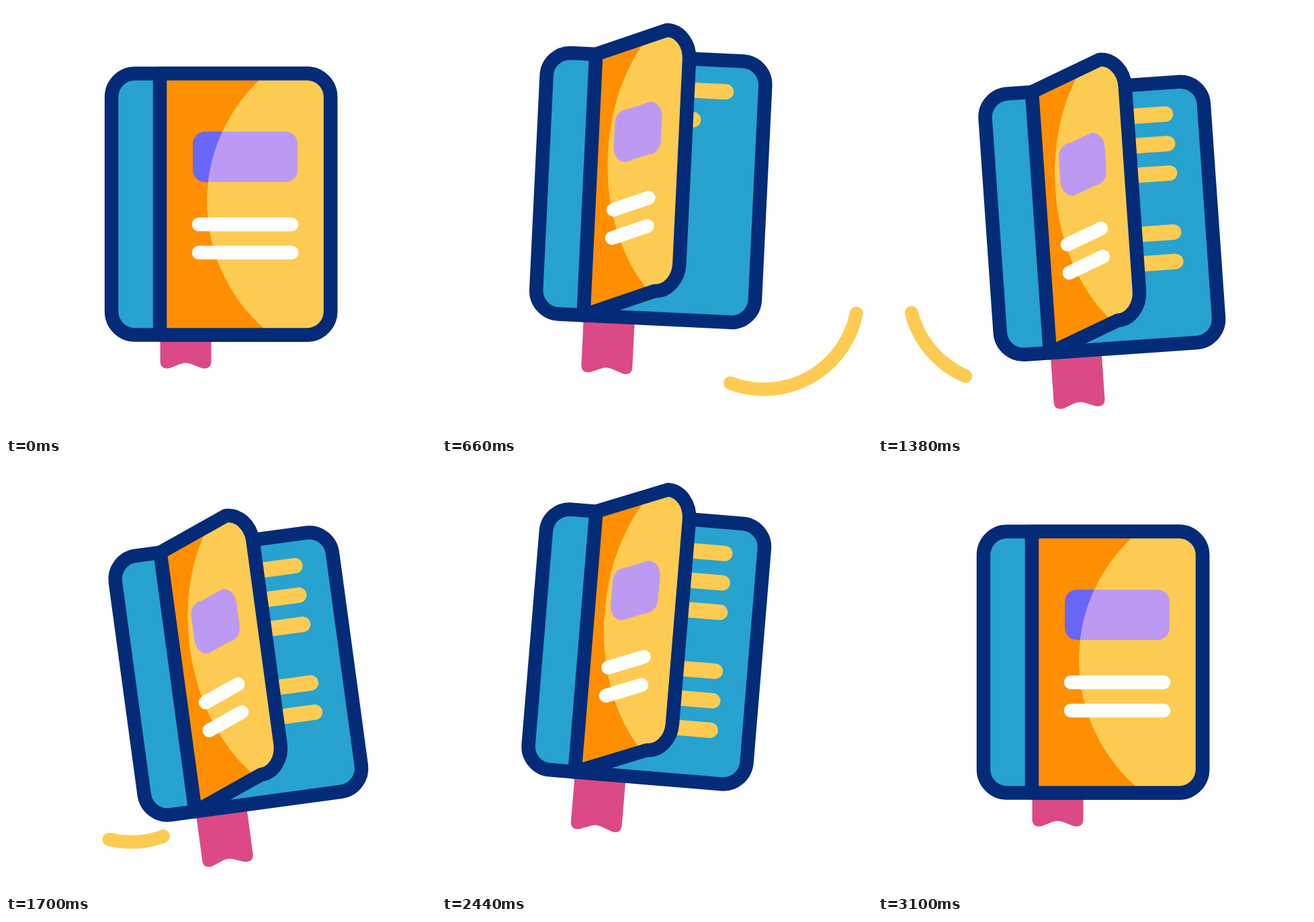
An HTML page with a canvas for the animation above (3.4 s loop, 640 by 640 pixels).

```html
<!DOCTYPE html>
<html lang="en">
<head>
<meta charset="utf-8">
<title>Notebook</title>
<style>
  html, body { margin: 0; height: 100%; overflow: hidden; background: #fff; }
  canvas { display: block; width: 640px; height: 640px; }
</style>
</head>
<body>
<canvas id="stage" width="640" height="640"></canvas>
<script>
const ctx = document.getElementById('stage').getContext('2d');
const LOOP = 3400, SPINE = 229, TOP = 100.5, BOTTOM = 489.5, BORDER = 20.5;
const NAVY = '#032b77', TEAL = '#28a2ce', ORANGE = '#ff8f00', YELLOW = '#fdcb52',
      VIOLET = '#6a67f8', LILAC = '#bc9af3', PINK = '#db4a87';
const ROW_STARTS = [320, 530, 740, 950, 1160, 1810];

const mix = (a, b, u) => a + (b - a) * u;
const radians = degrees => degrees * Math.PI / 180;

function ease(t, from, to) {
  const u = Math.min(1, Math.max(0, (t - from) / (to - from)));
  return u * u * (3 - 2 * u);
}

// Eased value through [time, value] keys
function track(t, keys) {
  let value = keys[0][1];
  for (let i = 1; i < keys.length; i++) {
    value += (keys[i][1] - keys[i - 1][1]) * ease(t, keys[i - 1][0], keys[i][0]);
  }
  return value;
}

function fill(path, color) {
  ctx.fillStyle = color;
  ctx.fill(path);
}

function stroke(path, color, width) {
  ctx.strokeStyle = color;
  ctx.lineWidth = width;
  ctx.stroke(path);
}

function line(x1, y1, x2, y2, color, width) {
  const path = new Path2D();
  path.moveTo(x1, y1);
  path.lineTo(x2, y2);
  stroke(path, color, width);
}

// Arc whose head runs ahead of its tail; both go from 0 to 1
function swoosh(x, y, from, to, head, tail) {
  if (head - tail < 0.002) return;
  const path = new Path2D();
  path.arc(x, y, 140.5, radians(mix(from, to, tail)), radians(mix(from, to, head)), to < from);
  stroke(path, YELLOW, 20);
}

// Panel with upright sides and sheared top and bottom edges, given as functions of x
function panel(left, right, top, bottom, leftRadius, radius, stretch) {
  const path = new Path2D();
  function corner(side, edge, rx, ry, towardSide) {
    const x = side + rx, y = edge(x), k = 0.552;
    const flat = [x, y], flatHandle = [mix(x, side, k), y];
    const upright = [side, y + ry], uprightHandle = [side, y + ry * (1 - k)];
    if (towardSide) {
      path.lineTo(...flat);
      path.bezierCurveTo(...flatHandle, ...uprightHandle, ...upright);
    } else {
      path.lineTo(...upright);
      path.bezierCurveTo(...uprightHandle, ...flatHandle, ...flat);
    }
  }
  corner(left, top, leftRadius, leftRadius * stretch, false);
  corner(right, top, -radius, radius * stretch, true);
  corner(right, bottom, -radius, -radius * stretch, false);
  corner(left, bottom, leftRadius, -leftRadius * stretch, true);
  path.closePath();
  return path;
}

function drawBookmark(drop) {
  ctx.save();
  ctx.translate(0, drop);
  fill(new Path2D('M229.5 440V530Q230 539.5 240 539.5Q242 539.5 245 538.4L259 533' +
    'Q267.5 529.5 276 533L290 538.4Q293 539.5 295 539.5Q305 539.5 305.5 530V440Z'), PINK);
  ctx.restore();
}

function drawPages(t) {
  const body = new Path2D();
  body.roundRect(157, TOP, 326, BOTTOM - TOP, 35);
  fill(body, TEAL);
  ROW_STARTS.forEach((start, i) => {
    const y = 147 + 44 * (i > 2 ? i + 1 : i);
    const u = ease(t, start, start + 210);
    if (u > 0) line(278, y, mix(278, 425, u), y, YELLOW, 23);
  });
  stroke(body, NAVY, BORDER);
}

function drawCover(open) {
  const slope = 0.395 * open ** 1.75;
  const stretch = 1 + 0.2 * open;
  const edge = y => x => y - slope * (x - SPINE);
  const printed = y => edge(y + (4 + 0.05 * y) * open);

  const cover = panel(SPINE, mix(483, 368, open), edge(TOP), edge(BOTTOM), 0, 35, stretch);
  const label = panel(mix(278, 262, open), mix(434, 331.5, open),
                      printed(187), printed(262), 18, 18, stretch);
  const glare = new Path2D();
  glare.ellipse(mix(550, 430, open), 292 - 44 * open, mix(251, 176.5, open), 251, 0, 0, 2 * Math.PI);

  ctx.save();
  ctx.clip(cover);
  fill(cover, ORANGE);
  fill(label, VIOLET);
  ctx.clip(glare);
  fill(glare, YELLOW);
  fill(label, LILAC);
  ctx.restore();

  const x1 = mix(287, 266, open), x2 = mix(425, 317.5, open), title = printed(325);
  for (const dy of [0, 42]) line(x1, title(x1) + dy, x2, title(x2) + dy, '#fff', BORDER);
  stroke(cover, NAVY, BORDER);
}

function draw(t) {
  const tilt = track(t, [[340, 0], [940, 5], [1640, -8], [2340, 5], [3040, 0]]);
  const bob = track(t, [[220, 0], [830, -30], [1530, 28], [2215, -30], [2900, 0]]);
  const open = track(t, [[220, 0], [505, 1], [2560, 1], [2880, 0]]);
  const drop = track(t, [[220, 0], [460, 34.5], [2560, 34.5], [2880, 0]]);

  ctx.clearRect(0, 0, 640, 640);
  ctx.lineCap = ctx.lineJoin = 'round';
  swoosh(479, 430, -7.4, 110.8, ease(t, 220, 520), ease(t, 540, 1020));
  swoosh(186, 422, 165.8, 70, ease(t, 1280, 1470), ease(t, 1460, 1860));

  ctx.save();
  ctx.translate(320, 103 + bob);
  ctx.rotate(radians(tilt));
  ctx.translate(-320, -103);
  drawBookmark(drop);
  drawPages(t);
  drawCover(open);
  ctx.restore();
}

const begin = performance.now();
function tick() {
  draw((performance.now() - begin) % LOOP);
  requestAnimationFrame(tick);
}
tick();
</script>
</body>
</html>
```
